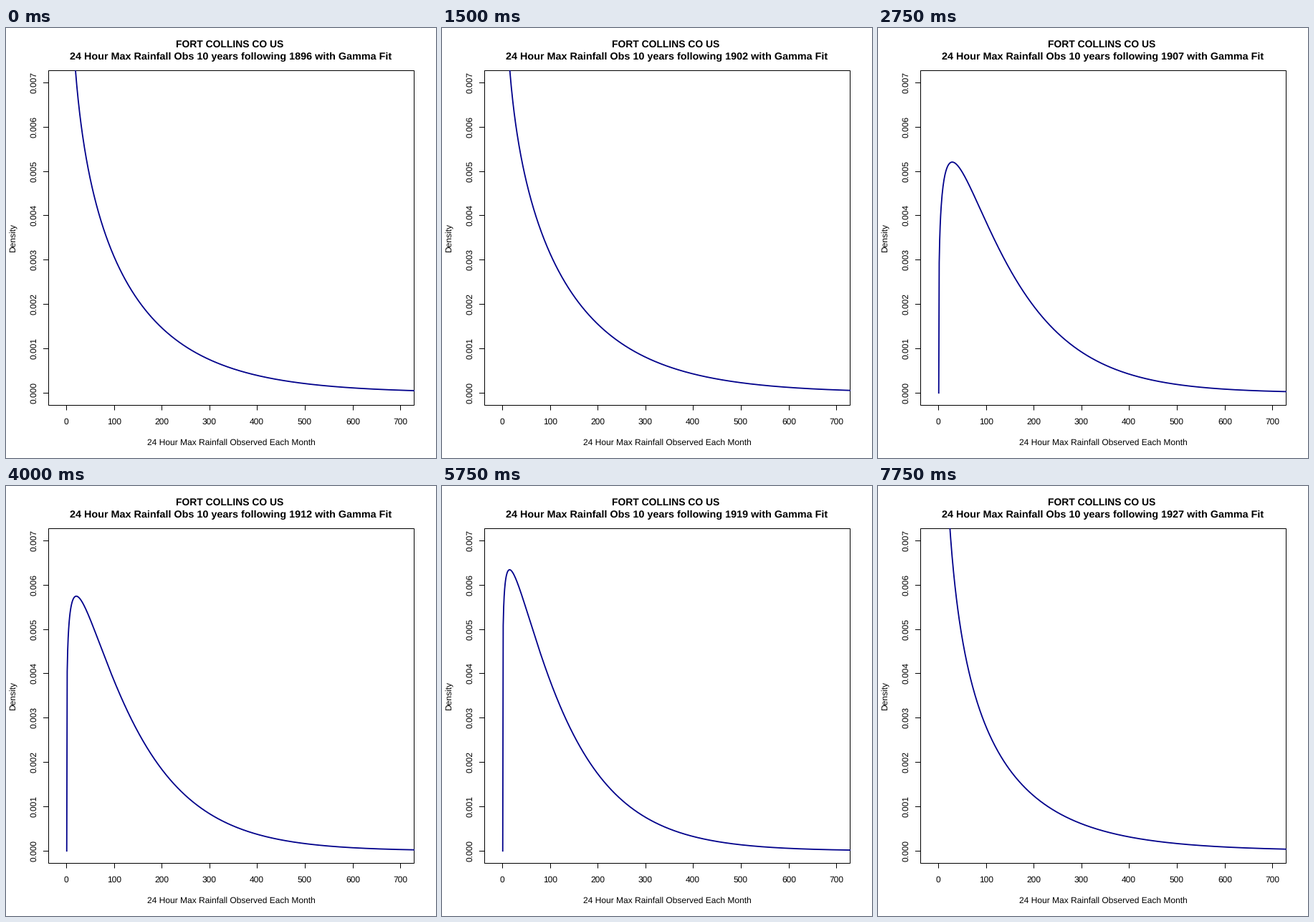
These frames come from a looping animation (600x600 px, 8 s). A matplotlib script:

```python
import math

import numpy as np
import matplotlib.pyplot as plt
from matplotlib.animation import FuncAnimation
from matplotlib.patches import Rectangle

plt.rcParams["font.family"] = "Liberation Sans"
plt.rcParams["text.hinting"] = "none"

SIZE = 600
FIRST_YEAR, YEARS = 1896, 32
LEFT, RIGHT, TOP, BOTTOM = 59.5, 569.5, 59.5, 526.5
X0, X_SCALE = 84.04, 0.666      # pixels per unit of rainfall
Y0, Y_SCALE = 509.24, 61840     # pixels per unit of density
PEN_SHIFT = 0.7                 # the pen covers the pixel to its right

# Fitted gamma parameters: year, shape, scale
FITS = np.array([
    (1896, 0.765, 174),
    (1902, 0.815, 173),
    (1907, 1.240, 118),
    (1912, 1.171, 117),
    (1919, 1.127, 113.5),
    (1923, 1.020, 126),
    (1926, 0.660, 178),
    (1927, 0.630, 180),
])

fig = plt.figure(figsize=(SIZE / 72, SIZE / 72), dpi=72, facecolor="white")
ax = fig.add_axes([0, 0, 1, 1])
ax.set_xlim(0, SIZE)
ax.set_ylim(SIZE, 0)
ax.axis("off")


def label(x, y, text, size=12, **kw):
    return ax.text(x, y, text, size=size, ha="center", va="baseline",
                   rotation_mode="anchor", **kw)


def stroke(xs, ys):
    # Coordinates sit on pixel centres, so snapping would move them
    ax.plot(xs, ys, color="black", lw=1, solid_capstyle="butt", snap=False)


def gamma_density(x, shape, scale):
    norm = math.gamma(shape) * scale ** shape
    return x ** (shape - 1) * np.exp(-x / scale) / norm


def curve_points(year):
    shape, scale = (np.interp(year, FITS[:, 0], FITS[:, c]) for c in (1, 2))
    # The density is infinite at zero when the shape is below one
    x = np.arange(0 if shape > 1 else 1, 751, dtype=float)
    y = gamma_density(x, shape, scale)
    return X0 + PEN_SHIFT + x * X_SCALE, Y0 - y * Y_SCALE


ax.add_patch(Rectangle((LEFT, TOP), RIGHT - LEFT, BOTTOM - TOP,
                       fill=False, ec="black", lw=1, snap=False))

for i in range(8):
    x = round(X0 + 100 * i * X_SCALE) + 0.5
    stroke([x, x], [BOTTOM, BOTTOM + 7])
    label(x - 0.5, 553, str(100 * i))

    y = math.floor(Y0 - 0.001 * i * Y_SCALE) + 0.5
    stroke([LEFT - 7.5, LEFT], [y, y])
    label(42.5, y - 0.5, f"{i / 1000:.3f}", rotation=90)

label(314, 582, "24 Hour Max Rainfall Observed Each Month")
label(13.7, 292.5, "Density", rotation=90)
label(312, 27, "FORT COLLINS CO US", 13.9, weight="bold")
title = label(313.9, 44, "", 14.4, weight="bold")

clip = Rectangle((59, 59), 511, 468, transform=ax.transData)
curve, = ax.plot([], [], color="#00008B", lw=1.8, snap=False, zorder=3)
curve.set_clip_path(clip)


def update(i):
    year = FIRST_YEAR + i
    title.set_text(f"24 Hour Max Rainfall Obs 10 years following {year} "
                   "with Gamma Fit")
    curve.set_data(*curve_points(year))
    return title, curve


anim = FuncAnimation(fig, update, frames=YEARS, interval=250, repeat=True,
                     repeat_delay=0)
plt.show()
```
